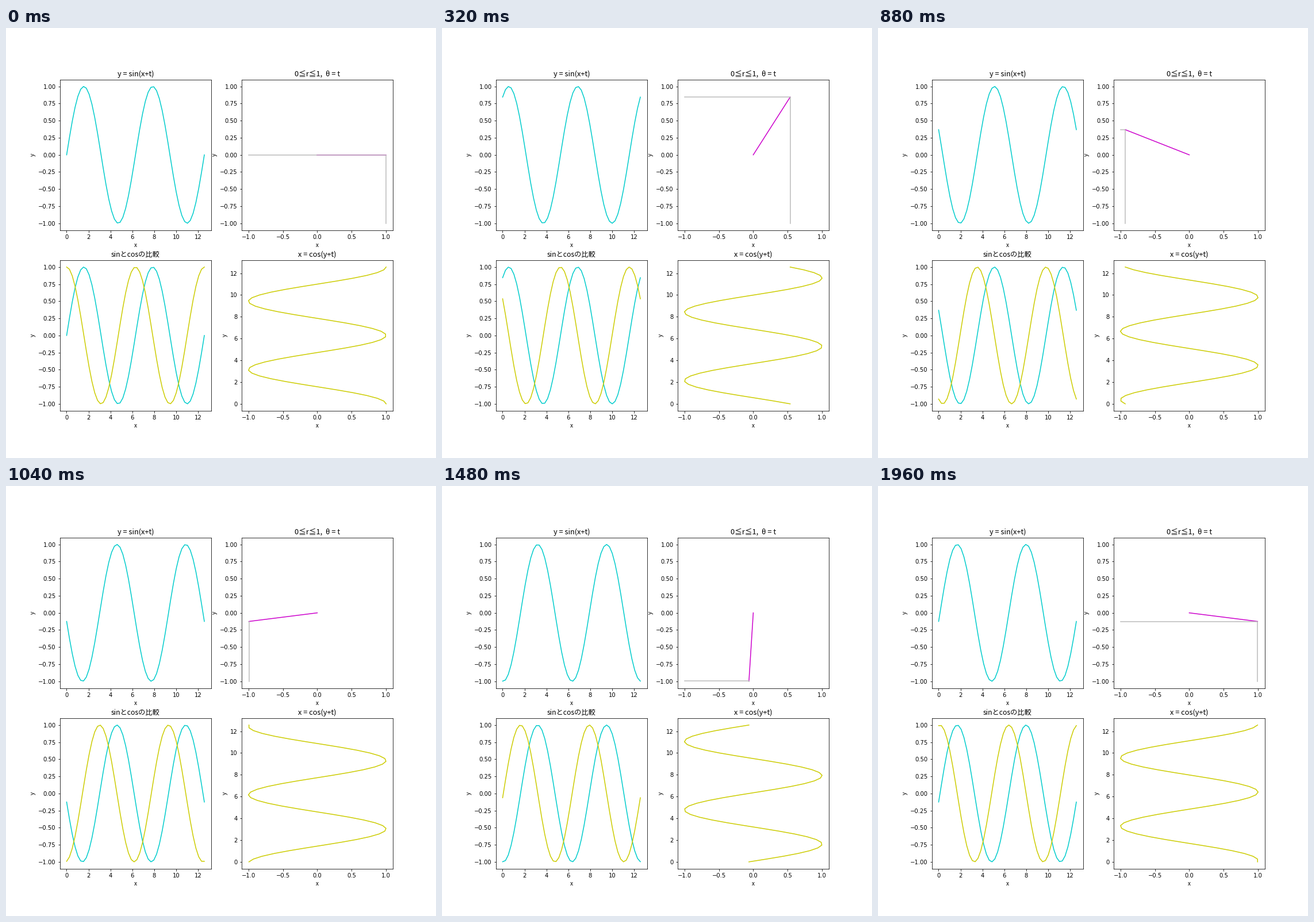
Recreate the animation shown at these times as a matplotlib script. Size 748 by 748 pixels, loop 2 s.

```python
import numpy as np
import matplotlib.pyplot as plt
from matplotlib.animation import FuncAnimation

SIZE, DPI = 748, 72
FRAMES, INTERVAL = 50, 40
CYAN, YELLOW, MAGENTA, GRAY = "#00cccc", "#cccc00", "#cc00cc", "#bbbbbb"
JP = "Noto Sans CJK JP"

plt.rcParams["font.family"] = "DejaVu Sans"
plt.rcParams["font.size"] = 10

UNIT = (-1.1, 1.1)
TURNS = (-0.2 * np.pi, 4.2 * np.pi)
u = np.linspace(0, 4 * np.pi, 50)

fig, axes = plt.subplots(2, 2, figsize=(SIZE / DPI, SIZE / DPI), dpi=DPI)
fig.subplots_adjust(left=0.125, right=0.9, bottom=0.11, top=0.88,
                    wspace=0.2, hspace=0.2)
(ax_sin, ax_polar), (ax_both, ax_cos) = axes


def setup(ax, title, xlim, ylim, size=12.8):
    ax.set_title(title, family=JP, fontsize=size)
    ax.set_xlabel("x", family=JP)
    ax.set_ylabel("y", family=JP)
    ax.set_xlim(xlim)
    ax.set_ylim(ylim)


def curve(ax, color):
    return ax.plot([], [], color=color, lw=1.5)[0]


setup(ax_sin, "y = sin(x+t)", TURNS, UNIT)
setup(ax_polar, "0≦r≦1,  θ = t", UNIT, UNIT)
setup(ax_both, "sinとcosの比較", TURNS, UNIT, size=12.2)
setup(ax_cos, "x = cos(y+t)", UNIT, TURNS)

sin_line = curve(ax_sin, CYAN)
radius = curve(ax_polar, MAGENTA)
guide = curve(ax_polar, GRAY)
both_sin = curve(ax_both, CYAN)
both_cos = curve(ax_both, YELLOW)
cos_line = curve(ax_cos, YELLOW)


def update(i):
    t = 2 * np.pi * i / FRAMES
    c, s = np.cos(t), np.sin(t)
    sin_u, cos_u = np.sin(u + t), np.cos(u + t)
    sin_line.set_data(u, sin_u)
    both_sin.set_data(u, sin_u)
    both_cos.set_data(u, cos_u)
    cos_line.set_data(cos_u, u)
    radius.set_data([0, c], [0, s])
    guide.set_data([-1, c, c], [s, s, -1])
    return sin_line, radius, guide, both_sin, both_cos, cos_line


anim = FuncAnimation(fig, update, frames=FRAMES, interval=INTERVAL,
                     repeat=True, repeat_delay=0, blit=False)
plt.show()
```
